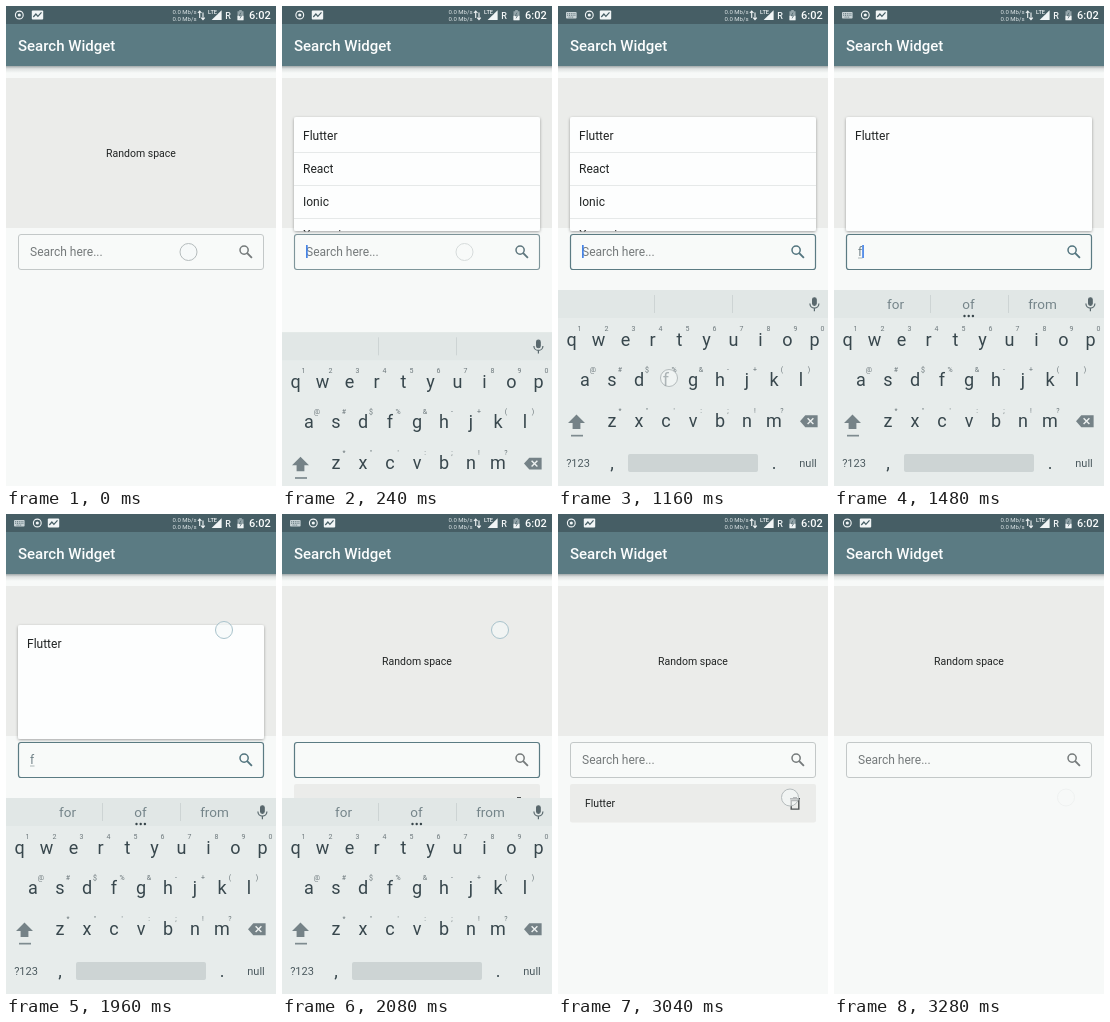
An HTML page for the animation above (4.84 s loop, 270 px wide and 480 px high).

```html
<!DOCTYPE html>
<html lang="en">
<head>
<meta charset="utf-8">
<title>Search Widget</title>
<style>
  html, body { margin: 0; width: 100%; height: 100%; overflow: hidden; background: #f7f9f8; }
  svg { display: block; width: 100%; height: 100%; font-family: Roboto, "Noto Sans", sans-serif; }
  .mid { text-anchor: middle; }
  .key { font-size: 18px; fill: #38474d; text-anchor: middle; }
  .sup { font-size: 7px; fill: #6d787c; text-anchor: middle; }
  .word { font-size: 13.5px; fill: #75858a; text-anchor: middle; }
  .item { font-size: 12px; fill: #212424; }
  .net { font-size: 6px; fill: #dce4e6; }
</style>
</head>
<body>
<svg viewBox="0 0 270 480" xmlns="http://www.w3.org/2000/svg">
  <defs>
    <linearGradient id="fall" x2="0" y2="1">
      <stop offset="0" stop-color="#2c3a3e" stop-opacity=".42"/>
      <stop offset=".4" stop-color="#2c3a3e" stop-opacity=".12"/>
      <stop offset="1" stop-color="#2c3a3e" stop-opacity="0"/>
    </linearGradient>
    <filter id="lift" x="-10%" y="-10%" width="120%" height="125%">
      <feDropShadow dx="0" dy="1" stdDeviation="1.5" flood-color="#000" flood-opacity=".36"/>
    </filter>
    <clipPath id="listClip"><rect x="12" y="111" width="246" height="114.4"/></clipPath>
  </defs>

  <rect width="270" height="480" fill="#f7f9f8"/>
  <rect y="72" width="270" height="150" fill="#ebecea"/>
  <text class="mid" x="135" y="151" font-size="10.5" fill="#212424">Random space</text>

  <g id="card">
    <rect x="12" y="270" width="246" height="38.5" rx="2" fill="#ebecea"/>
    <g id="cardBody">
      <text x="27" y="293" font-size="10.5" fill="#212424">Flutter</text>
      <g fill="none" stroke="#4f5354" stroke-width="1.4">
        <path d="M233.2 286.5v8.6h7.6v-8.6z"/>
        <path d="M232 284.7h10M235 283.6h4"/>
      </g>
    </g>
  </g>

  <rect id="field" x="12.5" y="228.5" width="245" height="35" rx="2.5" fill="#f8faf9" stroke="#c3c8c8"/>
  <text id="hint" x="24" y="250" font-size="12" fill="#757a7b">Search here...</text>
  <g id="typed">
    <text x="24" y="250" font-size="12" fill="#6f8086">f</text>
    <path d="M24 252h4.5" stroke="#8b999d" stroke-width=".7"/>
  </g>
  <rect id="caret" y="239" width="1.7" height="13" fill="#4583e6"/>
  <g id="lens" fill="none" stroke="#757a7b" stroke-width="1.5">
    <circle cx="238.1" cy="244.1" r="4.1"/>
    <path d="M241.2 247.2l4.7 4.7" stroke-width="1.9"/>
  </g>

  <g id="popup">
    <rect x="12" y="111" width="246" height="114" rx="2" fill="#fdfefe" filter="url(#lift)"/>
    <g clip-path="url(#listClip)">
      <text class="item" x="21" y="134">Flutter</text>
      <g id="others"></g>
    </g>
  </g>

  <g id="board">
    <rect y="284" width="270" height="196" fill="#e7eceb"/>
    <rect y="284" width="270" height="28" fill="#e1e7e6"/>
    <path d="M96.5 289v18M174.5 289v18" stroke="#cdd4d4"/>
    <g id="words">
      <text class="word" x="61.5" y="303">for</text>
      <text class="word" x="134.5" y="303">of</text>
      <text class="word" x="208.5" y="303">from</text>
      <g fill="#37454a"><circle cx="130.5" cy="310" r="1.2"/><circle cx="134.7" cy="310" r="1.2"/><circle cx="138.9" cy="310" r="1.2"/></g>
    </g>
    <g stroke="#59686d" fill="none" stroke-width="1.2">
      <rect x="254.6" y="291.8" width="3.6" height="7.6" rx="1.8" fill="#59686d"/>
      <path d="M251.9 297.6a4.5 4.5 0 0 0 9 0M256.4 302v3.2"/>
    </g>
    <g id="keys"></g>
    <path d="M18.5 408.5l8.5 8.5h-4.6v6h-7.8v-6H10z" fill="#758287"/>
    <rect x="13" y="428.8" width="12" height="1.7" fill="#7e8b8f"/>
    <path d="M247.3 409.3H259.6V421.2H247.3L242 415.2z" fill="#758287"/>
    <path d="M249.6 412.3l5.8 5.8M255.4 412.3l-5.8 5.8" stroke="#edf1f0" stroke-width="1.4"/>
    <rect x="70" y="448" width="130" height="18" rx="2" fill="#cdd4d4"/>
    <g class="mid" font-size="11" fill="#4d5b60">
      <text x="20" y="461">?123</text><text x="250" y="461">null</text>
    </g>
    <text class="key" x="54" y="463">,</text>
    <text class="key" x="216" y="463">.</text>
  </g>

  <rect y="60" width="270" height="7" fill="url(#fall)"/>
  <rect y="18" width="270" height="42" fill="#5b7b83"/>
  <rect width="270" height="18" fill="#465e65"/>
  <text x="12" y="45" font-size="15" font-weight="500" fill="#fbfdfd">Search Widget</text>

  <g id="kbIcon" fill="#c7d2d5">
    <rect x="8" y="6" width="10.6" height="6.6" rx=".8"/>
    <path d="M9.2 7.7h8.2M9.2 9.3h8.2M10.6 11.1h5.4" stroke="#465e65" stroke-width=".8" stroke-dasharray="1 .8"/>
  </g>
  <g id="ring" fill="none" stroke="#f1f5f6" stroke-width="1.1">
    <circle r="3.9"/><circle r="1.6" fill="#f1f5f6" stroke="none"/>
  </g>
  <g id="shot">
    <rect x="-5.5" y="-4.5" width="11.4" height="9" rx="1" fill="#f1f5f6"/>
    <path d="M-4 2l2.6-3 2 2.3 3.6-4" fill="none" stroke="#465e65" stroke-width="1.2"/>
  </g>
  <text class="net" x="166.5" y="7.6">0.0 Mb/s</text>
  <text class="net" x="166.5" y="15">0.0 Mb/s</text>
  <path d="M193.7 12V5.2M191.9 7l1.8-2 1.8 2M197 6.5v7M195.2 11.6l1.8 2 1.8-2" fill="none" stroke="#f1f5f6" stroke-width="1.1"/>
  <path d="M215.6 4.2v9.8h-10z" fill="#f1f5f6"/>
  <text x="202" y="8.2" font-size="5.6" font-weight="500" fill="#f1f5f6" stroke="#465e65" stroke-width="1" paint-order="stroke">LTE</text>
  <text class="mid" x="222" y="13" font-size="9" font-weight="500" fill="#f1f5f6">R</text>
  <path d="M233.2 4h2.6v1.2h1.7v9h-6v-9h1.7z" fill="#93a4a9"/>
  <rect x="231.5" y="9.8" width="6" height="4.4" fill="#f1f5f6"/>
  <path d="M235 6.6l-1.7 3.2h2.2l-1.5 2.6" fill="none" stroke="#465e65" stroke-width=".7"/>
  <text x="243" y="13" font-size="11" font-weight="500" fill="#fbfdfd">6:02</text>

  <circle id="tap" r="8.5" fill="#f5f8f8" fill-opacity=".62" stroke="#b5bcbd"/>
</svg>
<script>
const LOOP = 4840, STEP = 40;
const $ = id => document.getElementById(id);
const ids = ["card", "cardBody", "field", "hint", "typed", "caret", "lens", "popup",
  "others", "board", "words", "kbIcon", "ring", "shot", "tap"];
const el = Object.fromEntries(ids.map(id => [id, $(id)]));

// Keyboard rows: letters, hints, first key x, baseline, hint baseline
const rows = [
  ["qwertyuiop", "1234567890", 13.5, 340, 324.5],
  ["asdfghjkl", "@#$%&-+()", 27, 380, 366],
  ["zxcvbnm", "*\"':;!?", 54, 421, 407]
];

function put(parent, cls, x, y, str) {
  const node = document.createElementNS("http://www.w3.org/2000/svg", "text");
  node.setAttribute("class", cls);
  node.setAttribute("x", x);
  node.setAttribute("y", y);
  node.textContent = str;
  parent.append(node);
}

for (const [letters, hints, x, y, hy] of rows) {
  [...letters].forEach((ch, i) => {
    put($("keys"), "key", x + 27 * i, y, ch);
    put($("keys"), "sup", x + 27 * i + 8, hy, hints[i]);
  });
}

["React", "Ionic", "Xamarin"].forEach((name, i) => {
  const line = document.createElementNS("http://www.w3.org/2000/svg", "path");
  line.setAttribute("d", `M12 ${146.5 + 33 * i}h246`);
  line.setAttribute("stroke", "#e6e9e9");
  el.others.append(line);
  put(el.others, "item", 21, 167 + 33 * i, name);
});

// Touches: x, y, start, fade start, fade end, lasting opacity, outline
const taps = [
  [182.5, 246, 0, 160, 320, 0, "#b5bcbd"],
  [111, 372, 1160, 1200, 1440, 0, "#b5bcbd"],
  [218, 116, 1960, 2080, 2240, 0, "#a9c3cc"],
  [232, 283.5, 3040, 3120, 3280, .12, "#b5bcbd"]
];

const ramp = (t, a, b) => Math.min(1, Math.max(0, (t - a) / (b - a)));
const easeOut = p => 1 - (1 - p) ** 3;
const within = (t, a, b) => t >= a && t < b;
const show = (node, on) => node.setAttribute("opacity", Number(on));
const move = (node, x, y) => node.setAttribute("transform", `translate(${x} ${y})`);
const mix = (a, b, p) => `rgb(${a.map((v, i) => Math.round(v + (b[i] - v) * p))})`;

function draw(t) {
  const focus = ramp(t, 160, 280) - ramp(t, 2120, 2240);
  el.field.setAttribute("stroke", mix([195, 200, 200], [91, 123, 131], focus));
  el.field.setAttribute("stroke-width", 1 + .2 * focus);
  const lit = ramp(t, 160, 280) - ramp(t, 2000, 2080);
  el.lens.setAttribute("stroke", mix([117, 122, 123], [82, 116, 126], lit));

  show(el.hint, t < 1240 ? 1 : ramp(t, 2120, 2280));
  show(el.typed, within(t, 1240, 2000));
  show(el.caret, within(t, 240, 680) || within(t, 1160, 1800));
  el.caret.setAttribute("x", t < 1240 ? 24 : 28.2);

  show(el.popup, ramp(t, 160, 240) * (1 - ramp(t, 1960, 2040)));
  show(el.others, t < 1280);
  show(el.words, t >= 1320);

  const up = easeOut(ramp(t, 160, 360)) - ramp(t, 2080, 2240) ** 2;
  move(el.board, 0, 196 * (1 - up));

  const shift = easeOut(ramp(t, 220, 440)) - easeOut(ramp(t, 2080, 2280));
  move(el.ring, 13.3 + 18 * shift, 9);
  move(el.shot, 31.3 + 16 * shift, 9);
  show(el.kbIcon, ramp(t, 300, 480) - ramp(t, 2080, 2200));

  show(el.card, within(t, 2040, 3280) ? 1 - ramp(t, 3160, 3280) : 0);
  show(el.cardBody, 1 - ramp(t, 3120, 3240));

  const tap = taps.findLast(p => t >= p[2]);
  const [x, y, , from, to, rest, line] = tap;
  move(el.tap, x, y);
  el.tap.setAttribute("stroke", line);
  show(el.tap, 1 - (1 - rest) * ramp(t, from, to));
}

const start = performance.now();
function tick() {
  const t = (performance.now() - start) % LOOP;
  draw(Math.floor(t / STEP) * STEP);
  requestAnimationFrame(tick);
}
tick();
</script>
</body>
</html>
```
